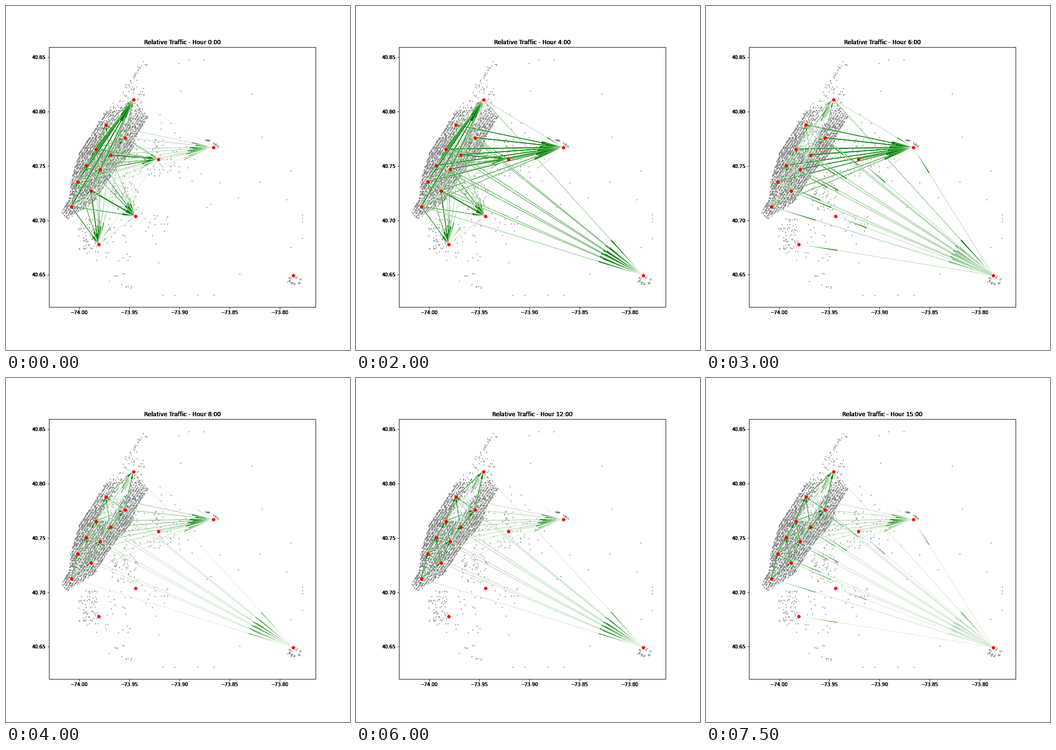
Write a matplotlib script that moves like this. It is 720 by 720 pixels and loops after 8000 ms.

```python
import numpy as np
import matplotlib.pyplot as plt
from matplotlib.animation import FuncAnimation
from matplotlib.collections import PolyCollection
from matplotlib.path import Path

FRAMES, STEP_MS = 16, 500
BOX = [0.125, 0.125, 0.775, 0.755]
rng = np.random.default_rng(4)

# Zone centres in stage pixels: ten in the city, three boroughs, two airports
ZONES = np.array([
    (266, 195), (208, 248), (248, 275), (187, 299), (218, 311),
    (167, 333), (196, 341), (149, 367), (177, 386), (136, 419),
    (270, 439), (193, 498), (318, 320), (433, 295), (600, 563)]) + 0.5
CITY, INNER = 10, 13
UPTOWN, EAST, SOUTH, BRIDGE, NEAR_PORT, FAR_PORT = 0, 10, 11, 12, 13, 14


def bump(h, centre, width):
    return np.exp(-((h - centre) / width) ** 2 / 2)


def rise(h, centre, rate=1):
    return 1 / (1 + np.exp(-rate * (h - centre)))


# Activity over the day
def night(h): return 1 - rise(h, 5.1, 3)
def late(h): return 0.25 + 0.9 * (1 - rise(h, 5, 2.5))
def flights(h): return 0.28 + 0.7 * bump(h, 5, 1.4)
def departures(h): return bump(h, 5, 1.4) + 0.5 * rise(h, 7.5)
def arrivals(h): return bump(h, 6, 0.6) + 0.8 * rise(h, 13)
def daytime(h): return 1 - 0.5 * bump(h, 4, 3)


# Goal, number of starting zones, favoured heading, focus, fade, reach, activity
PULLS = [
    (UPTOWN, CITY, -53, 20, 0, 2.6, late),
    (EAST, INNER, 30, 2, 1.5, 2.9, night),
    (SOUTH, INNER, 90, 2, 1.5, 2.7, night),
    (BRIDGE, INNER, 0, 6, 1.5, 2.8, night),
    (NEAR_PORT, INNER, 0, 8, 0, 3.2, flights),
    (FAR_PORT, CITY, 32, 8, 0, 1.7, departures)]


def find_routes():
    """Route list of start, tip, full width and activity."""
    routes = []
    for goal, starts, heading, focus, fade, reach, level in PULLS:
        for a in ZONES[:starts]:
            dx, dy = ZONES[goal] - a
            dist = np.hypot(dx, dy)
            if dist:
                turn = np.arctan2(dy, dx) - np.radians(heading)
                aim = max(0, np.cos(turn)) ** focus
                width = reach * aim * (100 / dist) ** fade
                routes.append((a, ZONES[goal], width, level))
    for a in ZONES[:CITY]:
        for b in ZONES[:CITY]:
            dist = np.hypot(*(b - a))
            if 0 < dist < 85:
                north = (a - b)[1] / dist
                routes.append((a, b, 1.5 + 0.4 * north, daytime))
    routes += [(ZONES[FAR_PORT], b, 0.8, arrivals) for b in ZONES[1:FAR_PORT]]
    return sorted(routes, key=lambda r: r[0][1])


ROUTES = find_routes()


def arrow(start, tip, width):
    """Outline of an arrow whose head takes a fifth of its length."""
    along = tip - start
    side = np.array([-along[1], along[0]]) / np.hypot(*along) * width / 2
    neck = start + 0.8 * along
    return [start + side, neck + side, neck + 3 * side, tip,
            neck - 3 * side, neck - side, start - side]


def arrows_at(hour):
    sized = [(a, b, w * level(hour)) for a, b, w, level in ROUTES]
    return [arrow(*s) for s in sized if s[2] > 0.2]


def island():
    """Dots along slanted avenues, clipped to the shore, thin in the park."""
    n = 15000
    lane = 4.8 * np.round(rng.uniform(-45, 90, n) / 4.8) + rng.normal(0, .8, n)
    run = rng.uniform(-170, 200, n)
    pts = np.column_stack([191.5 + .91 * lane + .56 * run,
                           293.7 + .41 * lane - .83 * run])
    shore = Path([(115, 434), (133, 398), (134, 370), (153, 308), (203, 226),
                  (256, 163), (285, 162), (291, 185), (283, 212), (297, 232),
                  (271, 275), (265, 300), (212, 364), (188, 407), (128, 446)])
    park = Path([(191, 294), (241, 220), (260, 228), (210, 302)])
    y = pts[:, 1]
    keep = 0.06 + 0.82 * np.exp(-((y - 325) / 88) ** 4) + 0.25 * rise(y, 385, .1)
    keep = np.where(y > 210, keep + 0.1, keep)
    keep = np.where(park.contains_points(pts), 0.08, keep)
    return pts[shore.contains_points(pts) & (rng.random(n) < keep)]


def blob(n, cx, cy, rx, ry):
    return (cx, cy) + rng.uniform(-1, 1, (n, 2)) * (rx, ry)


def trail(n, start, end, spread):
    t = rng.random((n, 1))
    line = np.array(start) * (1 - t) + np.array(end) * t
    return line + rng.normal(0, spread, (n, 2))


def ring(n, cx, cy, rx, ry):
    t = rng.uniform(0, 2 * np.pi, n)
    r = rng.uniform(.6, 1.1, n)
    return np.column_stack([cx + rx * r * np.cos(t), cy + ry * r * np.sin(t)])


def strays(n):
    x = np.minimum(310 + rng.exponential(110, n), 620)
    y = np.clip(rng.normal(355, 130, n), 112, 605)
    return np.column_stack([x, y])


dots = np.vstack([
    island(),
    trail(26, (252, 172), (290, 116), 4),
    blob(60, 288, 318, 42, 40),
    blob(16, 355, 323, 30, 37),
    blob(60, 248, 400, 28, 32),
    blob(62, 172, 478, 20, 33),
    blob(32, 214, 490, 48, 45),
    blob(14, 302, 456, 40, 24),
    blob(12, 237, 578, 25, 22),
    trail(18, (416, 280), (426, 281), .7),
    trail(12, (434, 287), (444, 294), .8),
    ring(36, 604, 574, 15, 8),
    strays(46)])

fig = plt.figure(figsize=(10, 10), dpi=72, facecolor="white")
ax = fig.add_axes(BOX, xlim=(90, 648), ylim=(630, 86.4))
ax.axis("off")
ax.scatter(*dots.T, s=1.4, color="gray", zorder=1)
flows = PolyCollection([], facecolor="green", edgecolor="white", linewidth=0.5,
                       joinstyle="miter", zorder=2)
ax.add_collection(flows, autolim=False)
ax.plot(*ZONES.T, "ro", ms=6, zorder=3)

# Stacked frames give the heavy, hard-edged lettering
titles = []
for layer in range(7):
    frame = fig.add_axes(BOX, facecolor="none", label=f"frame{layer}")
    frame.set_xticks(np.linspace(-74, -73.8, 5))
    frame.set_yticks(np.linspace(40.65, 40.85, 5))
    frame.set_xlim(-74.0302, -73.7645)
    frame.set_ylim(40.6203, 40.8592)
    titles.append(frame.set_title("", fontsize=12))


def draw(hour):
    flows.set_verts(arrows_at(hour))
    for title in titles:
        title.set_text(f"Relative Traffic - Hour {hour}:00")
    return [flows, *titles]


anim = FuncAnimation(fig, draw, frames=FRAMES, interval=STEP_MS,
                     repeat=True, repeat_delay=0)
plt.show()
```
